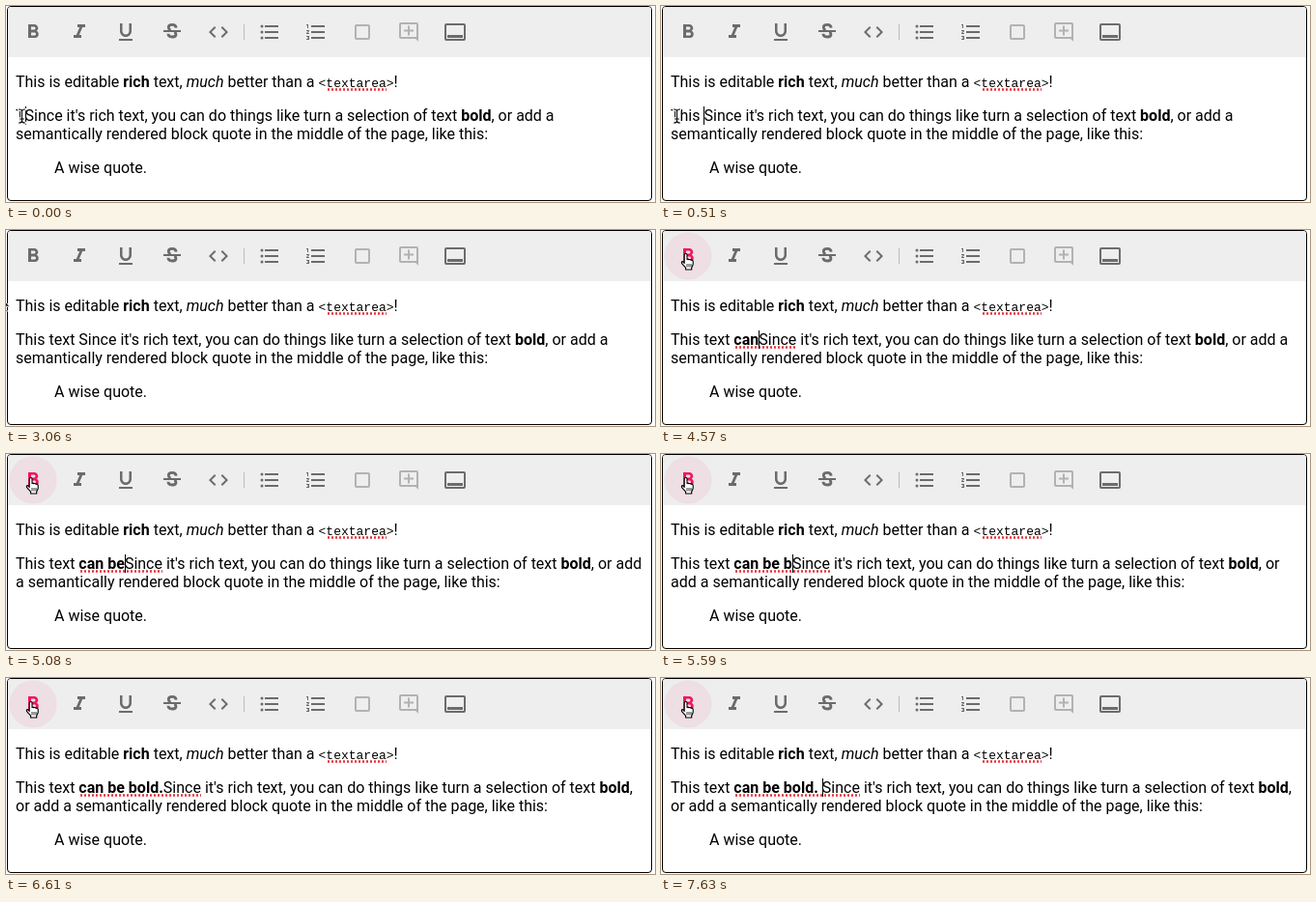
Write an HTML page that moves like this. It is 672x203 px and loops after 8000 ms.

```html
<!DOCTYPE html>
<html lang="en">
<head>
<meta charset="utf-8">
<title>Rich text editor</title>
<style>
html, body { margin: 0; width: 672px; height: 203px; overflow: hidden; background: #fff; }
#editor {
  position: absolute; left: 1px; top: 0; width: 668px; height: 202px; box-sizing: border-box;
  border: 1px solid #000; border-radius: 4px; overflow: hidden;
  font: 16px/19px Roboto, sans-serif; color: #000; white-space: nowrap;
}
#bar { height: 52px; background: #eee; }
p { margin: 16px 8px; }
.quote { margin-left: 48px; }
code { font: 13px/0 "Courier New", "Liberation Mono", monospace; }
.typo { background: radial-gradient(circle at 2px 1.5px, #e8343c 1px, transparent 1.5px) 1px 100% / 4px 3px repeat-x; }
#caret { position: absolute; width: 1px; height: 19px; background: #000; }
svg { position: absolute; left: 0; top: 0; }
.line { fill: none; stroke: currentColor; stroke-width: 2; }
</style>
</head>
<body>
<div id="editor">
  <div id="bar"></div>
  <p>This is editable <b>rich</b> text, <i>much</i> better than a <code>&lt;<span class="typo">textarea</span>&gt;</code>!</p>
  <p id="typed"></p>
  <p class="quote">A wise quote.</p>
</div>

<svg width="672" height="203" fill="currentColor" color="#6b6b6b">
  <circle id="hover" cx="28" cy="27" r="24.5" fill="#eddfe4"/>
  <path id="bold" transform="translate(16 15)" d="M15.6 10.79c.97-.67 1.65-1.77 1.65-2.79 0-2.26-1.75-4-4-4H7v14h7.04c2.09 0 3.71-1.7 3.71-3.79 0-1.52-.86-2.82-2.15-3.42zM10 6.5h3c.83 0 1.5.67 1.5 1.5s-.67 1.5-1.5 1.5h-3zm3.5 9H10v-3h3.5c.83 0 1.5.67 1.5 1.5s-.67 1.5-1.5 1.5z"/>
  <path transform="translate(64 15)" d="M10 4v3h2.21l-3.42 8H6v3h8v-3h-2.21l3.42-8H18V4z"/>
  <path transform="translate(112 15)" d="M12 17c3.31 0 6-2.69 6-6V3h-2.5v8c0 1.93-1.57 3.5-3.5 3.5S8.5 12.93 8.5 11V3H6v8c0 3.31 2.69 6 6 6zm-7 2v2h14v-2z"/>
  <g transform="translate(160 15)">
    <path d="M3 10h18v2H3z"/>
    <path class="line" style="stroke-width:2.8" d="M16.1 7.6C16 5.3 14.4 4.4 12.2 4.4 9.8 4.4 8.3 5.5 8.3 7.2q0 1.8 2.2 2.9M14.3 12q1.7.8 1.7 2.2c0 1.8-1.5 2.8-3.8 2.8-2.6 0-4.2-1.2-4.3-3.2"/>
  </g>
  <path transform="translate(208 15)" d="M9.4 16.6L4.8 12l4.6-4.6L8 6l-6 6 6 6zm5.2 0l4.6-4.6-4.6-4.6L16 6l6 6-6 6z"/>
  <path fill="#bbb" d="M246 19h1v16h-1z"/>
  <g transform="translate(261 15)">
    <circle cx="4" cy="6" r="1.5"/><circle cx="4" cy="12" r="1.5"/><circle cx="4" cy="18" r="1.5"/>
    <path class="line" d="M7 6h14M7 12h14M7 18h14"/>
  </g>
  <g transform="translate(309 15)">
    <path d="M2 17h2v.5H3v1h1v.5H2v1h3v-4H2zm1-9h1V4H2v1h1zm-1 3h1.8L2 13.1v.9h3v-1H3.2L5 10.9V10H2z"/>
    <path class="line" d="M7 6h14M7 12h14M7 18h14"/>
  </g>
  <g color="#b2b2b2">
    <rect class="line" x="362" y="20" width="14" height="14" rx="1"/>
    <path class="line" d="M426 34.5V19q0-1-1-1h-16q-1 0-1 1v13q0 1 1 1h15.4zM417 20.5v10M412 25.5h10"/>
  </g>
  <rect class="line" x="455" y="19" width="20" height="16" rx="1"/>
  <path d="M457 30h16v3h-16z"/>

  <g id="ibeam" fill="none" stroke-linecap="round">
    <path id="stem" stroke="#fff" stroke-width="3" d="M13.5 107q3 0 3 2v10q0 2-3 2M19.5 107q-3 0-3 2M16.5 119q0 2 3 2M14.5 117h4"/>
    <use href="#stem"/>
    <path stroke="#000" stroke-width="1.1" d="M13.5 107q3 0 3 2v10q0 2-3 2M19.5 107q-3 0-3 2M16.5 119q0 2 3 2M14.5 117h4"/>
  </g>
  <path id="arrow" fill="#000" stroke="#fff" d="M-7 68v15.5l3.6-3.4 2.4 5.2 2.4-1-2.3-5.1H4z"/>
  <g id="hand" fill="#fff" stroke="#000" stroke-width="1.1" stroke-linejoin="round">
    <path d="M24.2 34.5V26q0-1.5 1.4-1.5T27 26v4.6q1-.9 2 .2 1.2-.7 2 .5 1.4-.5 2.2.9v3.6l-1.5 3.2v2h-6.1v-1.8l-4-4.6q-.8-1.8.8-2 1 .2 1.8 1.9z"/>
    <path d="M27 35v3.5M29 35v3.5M31 35v3.5" stroke-width=".8"/>
  </g>
</svg>

<script>
// start time, plain text, bold text, first word of the second line, caret visible
const steps = [
  [0, 'T', '', 'semantically', 1],
  [510, 'This ', '', 'semantically', 1],
  [1020, 'This te', '', 'semantically', 1],
  [1530, 'This text ', '', 'semantically', 1],
  [2040, 'This text ', '', 'semantically', 0],
  [2550, 'This text ', '', 'semantically', 1],
  [3060, 'This text ', '', 'semantically', 0],
  [4070, 'This text ', '', 'semantically', 1],
  [4570, 'This text ', 'can', 'semantically', 1],
  [5080, 'This text ', 'can be', 'a', 1],
  [5590, 'This text ', 'can be b', 'add', 1],
  [6100, 'This text ', 'can be bol', 'add', 0],
  [6610, 'This text ', 'can be bold.', 'or', 0],
  [7120, 'This text ', 'can be bold.', 'or', 1],
  [7630, 'This text ', 'can be bold. ', 'or', 1]
];
const tail = ', or add a semantically rendered block quote in the middle of the page, like this:';
const $ = id => document.getElementById(id);
const show = (id, on) => $(id).style.display = on ? '' : 'none';
let current;

function paragraph([, plain, bold, word, caret]) {
  const mark = caret ? '<span id="caret"></span>' : '';
  const typed = `<span class="${bold ? 'typo' : ''}"><b>${bold}</b>${mark}Since</span>`;
  return `${plain}${typed} it's rich text, you can do things like turn a selection of text <b>bold</b>`
    + tail.replace(` ${word} `, `<br>${word} `);
}

function draw() {
  const t = performance.now() % 8000;
  const step = steps.findLast(s => s[0] <= t);
  if (step !== current) $('typed').innerHTML = paragraph(current = step);
  const pressed = t >= 3560;
  show('ibeam', t < 3060);
  show('arrow', t >= 3060 && !pressed);
  show('hand', pressed);
  show('hover', pressed);
  $('bold').style.fill = pressed ? '#f01464' : '';
  requestAnimationFrame(draw);
}
draw();
</script>
</body>
</html>
```
